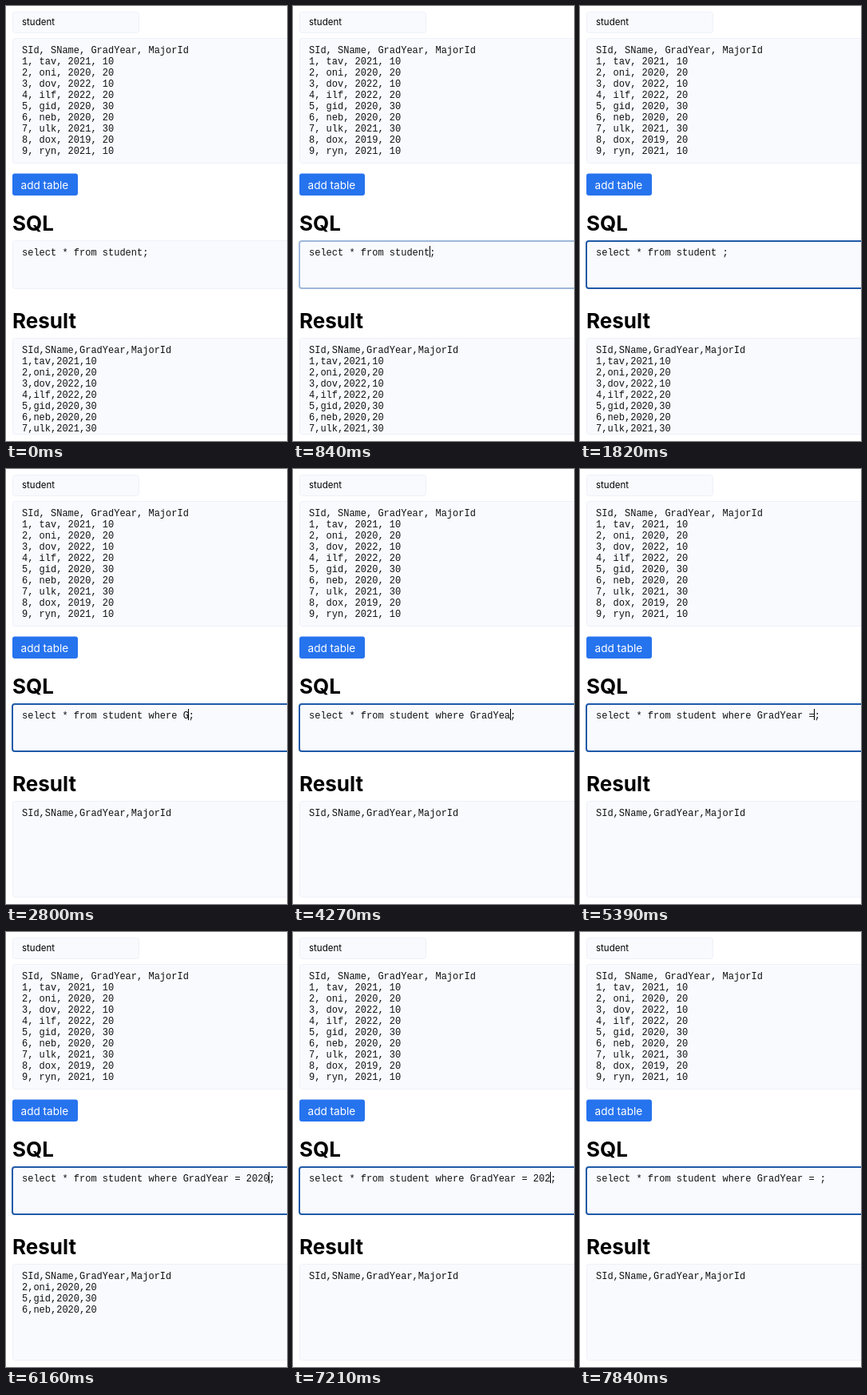
Recreate the animation shown at these times as an HTML page. Size 352x544 px, loop 8 s.

```html
<!DOCTYPE html>
<html lang="en">
<head>
<meta charset="utf-8">
<title>SQL playground</title>
<style>
  html, body { margin: 0; width: 100%; height: 100%; overflow: hidden; background: #fff; }
  svg { display: block; width: 352px; height: 544px; }
  text { font-family: Inter, "Open Sans", sans-serif; fill: #000; white-space: pre; }
  .code text { font: 12px "Liberation Mono", monospace; fill: #111; }
  .field { fill: #f8fafe; stroke: #eef1f7; }
  .heading { font-size: 26px; font-weight: 700; }
  #ring { fill: none; stroke: #1f5aa8; stroke-width: 2; }
</style>
</head>
<body>
<svg viewBox="0 0 352 544">
  <g class="field">
    <rect x="8.5" y="7.5" width="158" height="26" rx="3"/>
    <rect x="8.5" y="40.5" width="360" height="156" rx="3"/>
    <rect x="8.5" y="293.5" width="360" height="60" rx="3"/>
    <rect x="8.5" y="415.5" width="360" height="120" rx="3"/>
  </g>
  <text x="20" y="24" font-size="11.5">student</text>
  <rect x="8" y="209.5" width="82" height="27.5" rx="3" fill="#2673ee"/>
  <text x="18.5" y="229" font-size="13.6" style="fill:#fff">add table</text>
  <text class="heading" x="8" y="281">SQL</text>
  <text class="heading" x="8" y="403">Result</text>
  <rect id="ring" x="8" y="294" width="362" height="59" rx="3" opacity="0"/>
  <g class="code" id="table"></g>
  <g class="code" id="query"></g>
  <g class="code" id="result"></g>
  <rect id="caret" y="300" width="1" height="14" visibility="hidden"/>
</svg>
<script>
  const LOOP = 8000, CHAR = 7.2, LEFT = 20, BLINK = 490, FOCUS = 770;
  const FULL = "select * from student where GradYear = 2020";
  const START = "select * from student".length;
  const typed = [1330, 1890, 2030, 2100, 2240, 2380, 2520,
    2800, 3010, 3150, 3290, 3640, 3850, 4270, 4480, 5110,
    5390, 5530, 5740, 5880, 6020, 6160];
  const erased = [7210, 7260, 7305, 7350];
  const keys = [FOCUS, ...typed, ...erased];

  const header = ["SId", "SName", "GradYear", "MajorId"];
  const rows = [
    ["tav", 2021, 10], ["oni", 2020, 20], ["dov", 2022, 10],
    ["ilf", 2022, 20], ["gid", 2020, 30], ["neb", 2020, 20],
    ["ulk", 2021, 30], ["dox", 2019, 20], ["ryn", 2021, 10]
  ].map((row, i) => [i + 1, ...row]);

  const el = id => document.getElementById(id);
  const shown = {};

  function write(id, y, lines) {
    const key = lines.join("\n");
    if (shown[id] === key) return;
    shown[id] = key;
    el(id).replaceChildren(...lines.map((line, i) => {
      const node = document.createElementNS("http://www.w3.org/2000/svg", "text");
      node.setAttribute("x", LEFT);
      node.setAttribute("y", y + 14 * i);
      node.textContent = line;
      return node;
    }));
  }

  function select(query) {
    if (!query.includes("where G")) return rows;
    const year = query.split("= ")[1];
    return rows.filter(row => String(row[2]) === year);
  }

  function draw(t) {
    const count = list => list.filter(time => time <= t).length;
    const length = START + count(typed) - count(erased);
    const query = FULL.slice(0, length);
    write("query", 312, [query + ";"]);
    write("result", 434, [header, ...select(query)].slice(0, 8).map(r => r.join(",")));

    const focus = t < 840 ? 0 : t < 910 ? 0.4 : t < 980 ? 0.8 : 1;
    el("ring").setAttribute("opacity", focus);

    const lastKey = keys.filter(time => time <= t).pop();
    const lit = focus > 0 && (t - lastKey) % (2 * BLINK) < BLINK;
    const caret = el("caret");
    caret.setAttribute("x", Math.round(LEFT + length * CHAR - 0.5));
    caret.setAttribute("visibility", lit ? "visible" : "hidden");
  }

  write("table", 59, [header, ...rows].map(r => r.join(", ")));
  const begin = performance.now();
  function tick() {
    draw((performance.now() - begin) % LOOP);
    requestAnimationFrame(tick);
  }
  tick();
</script>
</body>
</html>
```
